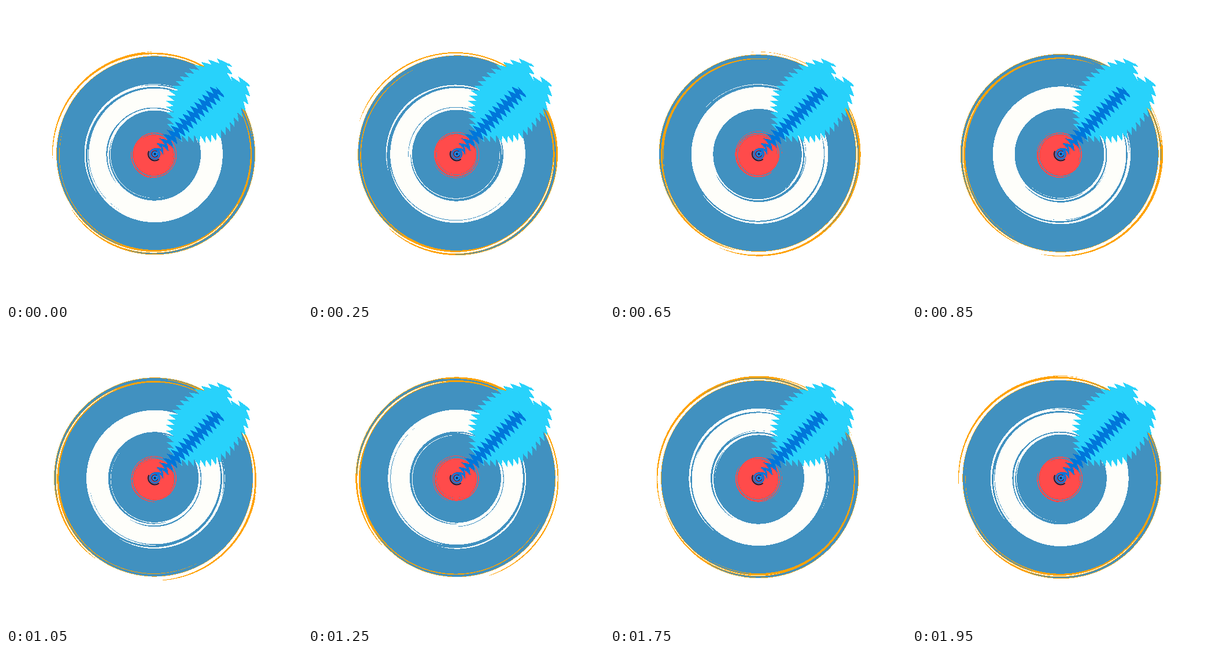
Animation of 512x512 px, one loop 2 s. Source, as an HTML page with a canvas:

```html
<!DOCTYPE html>
<html lang="en">
<head>
<meta charset="utf-8">
<title>Rippled dartboard</title>
<style>
  html, body { margin: 0; width: 100%; height: 100%; overflow: hidden; background: #fff; }
  canvas { display: block; width: 512px; height: 512px; }
</style>
</head>
<body>
<canvas id="stage" width="512" height="512"></canvas>
<script>
const SIZE = 512, LOOP = 2000, STEP = 50, TAU = Math.PI * 2;
const RIPPLE = 9.4;
const ctx = document.getElementById('stage').getContext('2d');
const image = ctx.createImageData(SIZE, SIZE);
const pixels = new Uint32Array(image.data.buffer);

// Hex RGB to little-endian RGBA
const pack = c => (0xff000000 | (c & 255) << 16 | (c & 0xff00) | c >> 16) >>> 0;
const WHITE = pack(0xffffff), CREAM = pack(0xfefefa), BLUE = pack(0x4191c0),
      RED = pack(0xff4b4b), ORANGE = pack(0xffa200),
      CYAN = pack(0x28d2fb), SHAFT = pack(0x0076da);

function boardColor(r) {
  if (r < 37.5) return RED;
  if (r < 79) return BLUE;
  if (r < 117.5) return CREAM;
  if (r < 169) return BLUE;
  return r < 172.6 ? ORANGE : WHITE;
}

// Vane half-widths along the dart's axis
const VANE = [[40, 0], [50, 11], [62, 25], [85, 48], [100, 56], [125, 59],
              [160, 55], [180, 46], [194, 35], [201, 26]];

function vaneWidth(a) {
  for (let i = 1; i < VANE.length; i++) {
    const [a0, w0] = VANE[i - 1], [a1, w1] = VANE[i];
    if (a >= a0 && a < a1) return w0 + (w1 - w0) * (a - a0) / (a1 - a0);
  }
  return 0;
}

// The dart is sheared along circles into a zigzag
function dartColor(x, y) {
  const dx = x - 257, dy = y - 256, r = Math.hypot(dx, dy);
  const tri = 4 * Math.abs(r / RIPPLE % 1 - 0.5) - 1;
  const angle = Math.atan2(dy, dx) + Math.PI / 4 + 7 * tri / Math.max(r, 2);
  const a = r * Math.cos(angle), b = Math.abs(r * Math.sin(angle));
  if (a > 0 && a < 157 && b < Math.min(9, 3 + a * 0.15)) return SHAFT;
  if (b < vaneWidth(a) && b > (a - 184) * 1.1) return CYAN;
  return 0;
}

const cells = [];
for (let y = 0; y < SIZE; y++) {
  for (let x = 0; x < SIZE; x++) {
    const i = y * SIZE + x, dx = x - 256, dy = y - 256.5;
    const r = Math.hypot(dx, dy);
    pixels[i] = dartColor(x, y) || WHITE;
    if (pixels[i] === WHITE && r < 184) {
      cells.push({ i, r, angle: Math.atan2(dy, dx) + Math.PI / 4, drift: 3.3 + r * 0.0115 });
    }
  }
}

function arc(color, width, r, from, to) {
  ctx.strokeStyle = color;
  ctx.lineWidth = width;
  ctx.beginPath();
  ctx.arc(257.5, 256, r, from, to);
  ctx.stroke();
}

function drawTip() {
  arc('#0a2340', 2, 11.5, 0.9, 3.6);
  arc('#0076da', 2.5, 8.5, 0, TAU);
  arc('#0a3470', 1.6, 5.5, 0.4, 5.4);
  arc('#1687e8', 2.5, 3.5, 0, TAU);
  arc('#06305f', 2, 1, 0, TAU);
}

// Each circle of the off-centre board turns by a wave travelling outwards,
// stronger towards the middle
function draw(progress) {
  const twist = [];
  for (let k = 0; k <= 184 * 8; k++) {
    const r = k / 8, strength = 1.6 * Math.sqrt(172 / Math.max(r, 20));
    twist.push(strength * Math.cos(TAU * ((r - 176.5) / RIPPLE - progress)));
  }
  for (const { i, r, angle, drift } of cells) {
    pixels[i] = boardColor(r - drift * Math.cos(angle + twist[Math.round(r * 8)]));
  }
  ctx.putImageData(image, 0, 0);
  drawTip();
}

const start = performance.now();
let shown = -1;

function tick() {
  const step = Math.floor((performance.now() - start) % LOOP / STEP);
  if (step !== shown) {
    shown = step;
    draw(step * STEP / LOOP);
  }
  requestAnimationFrame(tick);
}
tick();
</script>
</body>
</html>
```
